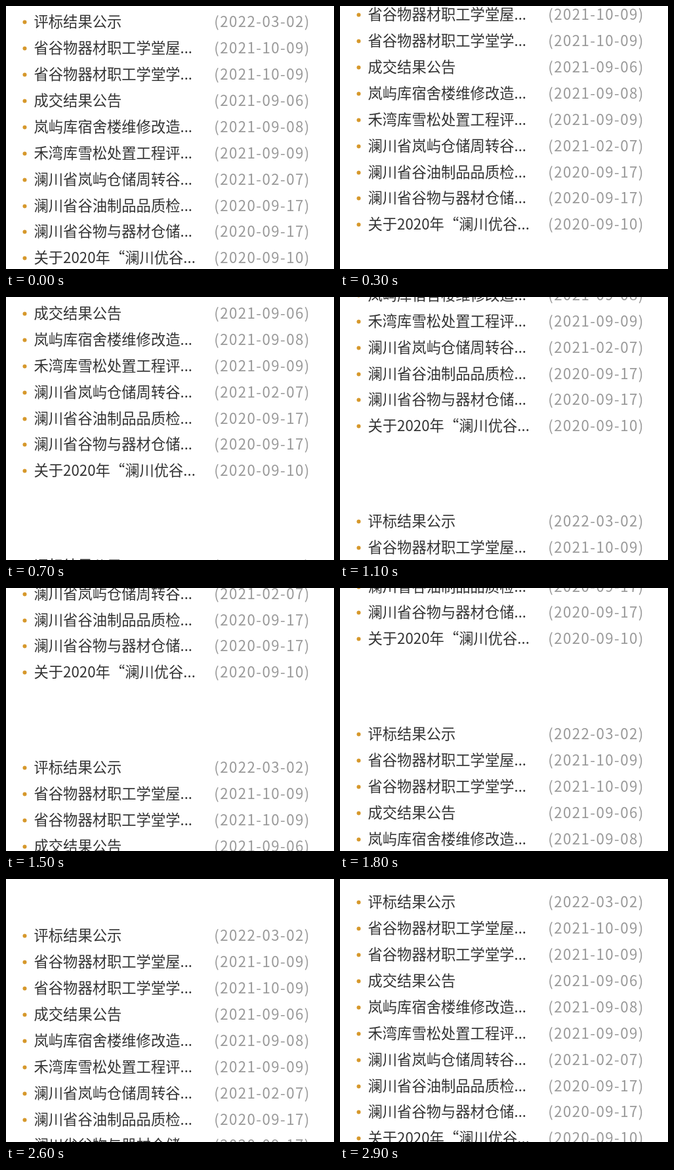
These frames come from a looping animation (500x400 px, 3000 ms). An HTML page:

```html
<!DOCTYPE html>
<html lang="zh-CN">
<head>
<meta charset="utf-8">
<title>公告列表</title>
<style>
html, body { margin: 0; width: 100%; height: 100%; overflow: hidden; background: #fff; }
svg { display: block; }
text { font: 22.3px "Noto Sans CJK SC", "Noto Sans CJK", sans-serif; fill: #333; }
.date { fill: #999; letter-spacing: 1.4px; }
circle { fill: #d6982b; }
</style>
</head>
<body>
<svg width="500" height="400" viewBox="0 0 500 400">
  <g id="track">
    <g id="list"></g>
    <use href="#list" y="504"/>
  </g>
</svg>
<script>
const ROW = 39.93, STEP_MS = 100, STEPS = 30, STEP_PX = 17;
const rows = [
  ["评标结果公示", "2022-03-02"],
  ["省谷物器材职工学堂屋...", "2021-10-09"],
  ["省谷物器材职工学堂学...", "2021-10-09"],
  ["成交结果公告", "2021-09-06"],
  ["岚屿库宿舍楼维修改造...", "2021-09-08"],
  ["禾湾库雪松处置工程评...", "2021-09-09"],
  ["澜川省岚屿仓储周转谷...", "2021-02-07"],
  ["澜川省谷油制品品质检...", "2020-09-17"],
  ["澜川省谷物与器材仓储...", "2020-09-17"],
  ["关于2020年“澜川优谷...", "2020-09-10"]
];

document.getElementById("list").innerHTML = rows.map(([title, date], i) => {
  const y = Math.round(i * ROW);
  return `<circle cx="28.5" cy="${y + 24.5}" r="3"/>
    <text x="42.5" y="${y + 32}">${title}</text>
    <text class="date" x="317.3" y="${y + 32}">(${date})</text>`;
}).join("");

const track = document.getElementById("track");
function draw() {
  const step = Math.floor(performance.now() / STEP_MS) % STEPS;
  track.setAttribute("transform", `translate(0 ${-step * STEP_PX})`);
  requestAnimationFrame(draw);
}
draw();
</script>
</body>
</html>
```
